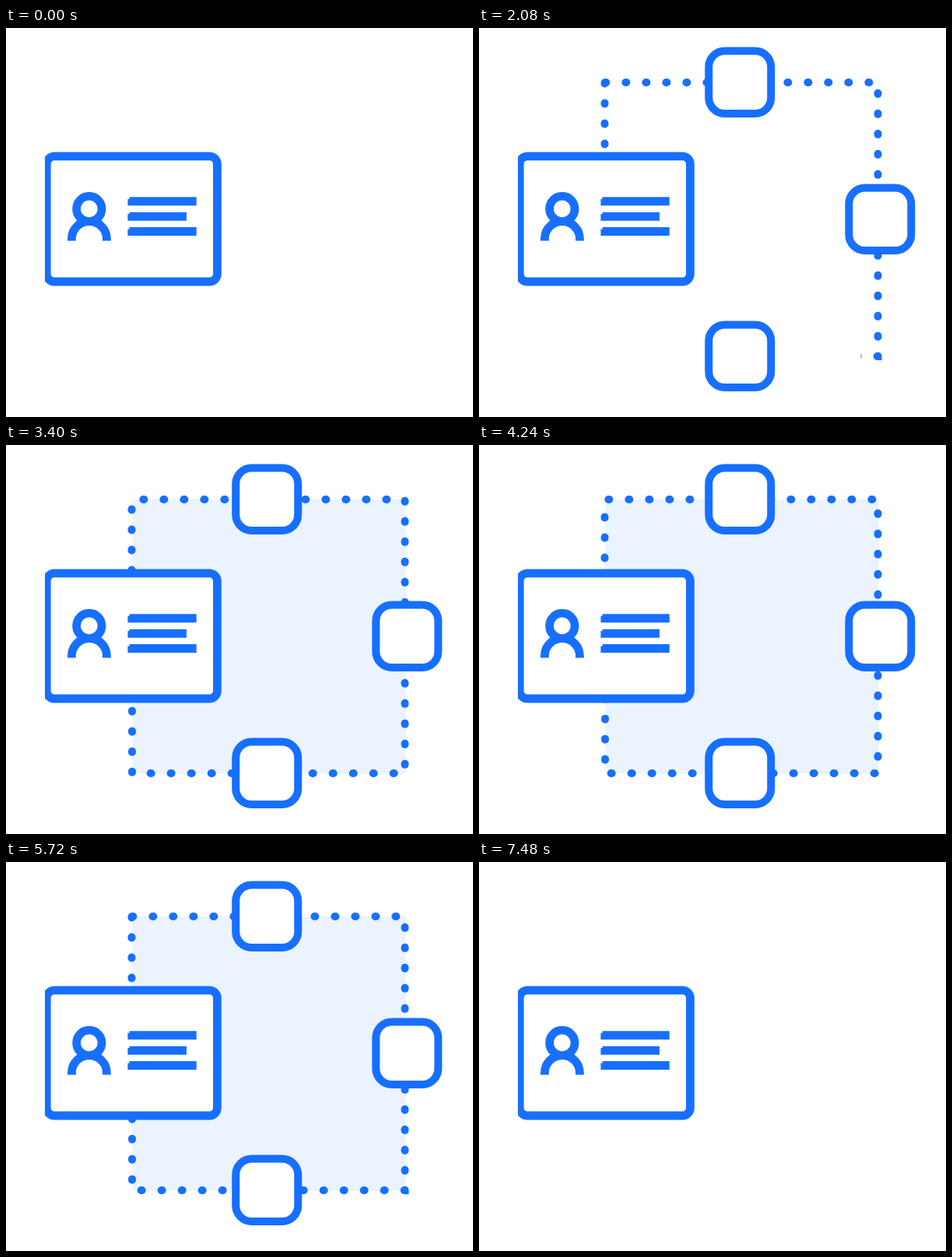
An HTML page for the animation above (8.36 s loop, 600x500 px).

```html
<!DOCTYPE html>
<html lang="en">
<head>
<meta charset="utf-8">
<title>Connected ID card</title>
<style>
  html, body { margin: 0; width: 100%; height: 100%; overflow: hidden; background: #fff; }
  svg { display: block; width: 600px; height: 500px; }

  :root {
    --blue: #176fff;
    --loop: 8360ms;
    --ease: cubic-bezier(.333, 0, .667, 1);
  }

  .area { fill: var(--blue); opacity: 0; animation: fade var(--loop) linear infinite; }

  .dots { fill: none; stroke: var(--blue); stroke-width: 10; stroke-linecap: round; stroke-dasharray: 1 25; }
  .dots path { animation: march var(--loop) linear infinite; }

  .trim {
    fill: none; stroke: #fff; stroke-width: 16;
    stroke-dasharray: 1 2; stroke-dashoffset: 1;
    animation: trim var(--loop) var(--ease) infinite;
  }

  .node {
    fill: #fff; stroke: var(--blue); stroke-width: 10;
    transform-box: fill-box; transform-origin: center; transform: scale(0);
    animation: pop var(--loop) var(--ease) infinite backwards;
  }
  .right { animation-delay: 40ms; }
  .bottom { animation-delay: 80ms; }

  .card { fill: #fff; stroke: var(--blue); stroke-width: 10.8; }
  .text { fill: var(--blue); }

  /* 50 px per second along the path */
  @keyframes march {
    from { stroke-dashoffset: var(--start); }
    to { stroke-dashoffset: calc(var(--start) - 418px); }
  }
  @keyframes trim {
    0%, 5.084% { stroke-dashoffset: 1; }
    38.337%, 74.641% { stroke-dashoffset: 0; }
    88.517%, 100% { stroke-dashoffset: -1; }
  }
  @keyframes pop {
    0%, 2.99% { transform: scale(0); }
    7.536% { transform: scale(1.1); }
    10.048%, 81.818% { transform: scale(1); }
    84.211% { transform: scale(1.1); }
    88.517%, 100% { transform: scale(0); }
  }
  @keyframes fade {
    0%, 28.708% { opacity: 0; }
    38.278%, 74.641% { opacity: .08; }
    81.818%, 100% { opacity: 0; }
  }
</style>
</head>
<body>
<svg viewBox="0 0 600 500">
  <defs>
    <mask id="wipe" maskUnits="userSpaceOnUse" x="0" y="0" width="600" height="500">
      <path class="trim" pathLength="1" d="M161.5 247V70H512.5V422H162V247"/>
    </mask>
    <clipPath id="edge"><rect x="50" y="0" width="550" height="500"/></clipPath>
  </defs>

  <rect class="area" x="162.5" y="70" width="351" height="352.5"/>

  <g class="dots" mask="url(#wipe)">
    <path style="--start: -19.5px" d="M161.5 247V70"/>
    <path style="--start: -.8px" d="M161.5 70H512.5V422H162V247"/>
  </g>

  <rect class="node" x="295.2" y="29.5" width="80" height="80.5" rx="20.5"/>
  <rect class="node right" x="475.3" y="205.5" width="80" height="80.5" rx="20.5"/>
  <rect class="node bottom" x="295.2" y="381.5" width="80" height="80.5" rx="20.5"/>

  <g class="card" clip-path="url(#edge)">
    <rect x="52.2" y="164.8" width="219.2" height="161.2" rx="10"/>
    <path d="M84.4 273.5V271a22.5 22.5 0 0 1 45 0V273.5"/>
    <circle cx="106.8" cy="232.4" r="16.2"/>
  </g>
  <g class="text">
    <path d="M158.6 217.3H244.7V228.3H156.4V219.7H158.6Z"/>
    <path d="M158.6 236.7H231.9V247.7H156.4V239.1H158.6Z"/>
    <path d="M158.6 256H244.7V267H156.4V258.4H158.6Z"/>
  </g>
</svg>
</body>
</html>
```
